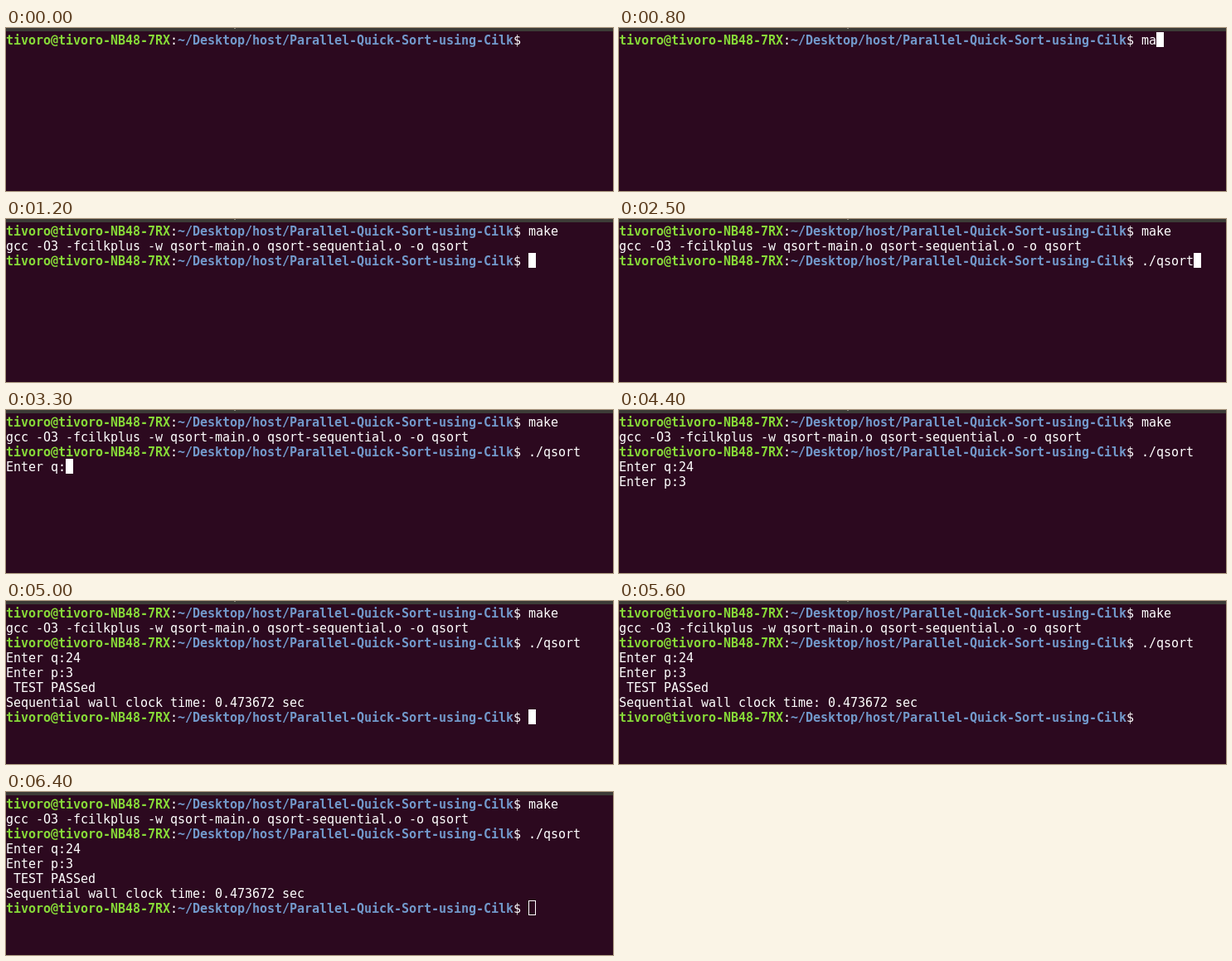
An HTML page with a canvas that plays this animation: 732 by 197 pixels, repeating every 6500 ms.

```html
<!DOCTYPE html>
<html lang="en">
<head>
<meta charset="utf-8">
<title>Terminal session</title>
<style>
  html, body { margin: 0; width: 100%; height: 100%; overflow: hidden; background: #2c091f; }
  canvas { display: block; }
</style>
</head>
<body>
<canvas id="screen" width="732" height="197"></canvas>
<script>
const ctx = document.getElementById('screen').getContext('2d', { alpha: false });

const LOOP = 6500;
const CELL_W = 9, CELL_H = 18, TOP = 5, ASCENT = 15;
const FONT = '15px "DejaVu Sans Mono", monospace';
const BACKGROUND = '#2c091f', WHITE = '#ffffff', GREEN = '#87da38', BLUE = '#7299cb';

const USER = 'tivoro@tivoro-NB48-7RX';
const PATH = '~/Desktop/host/Parallel-Quick-Sort-using-Cilk';
const PROMPT = `${USER}:${PATH}$ `;

// Text added to the terminal: [time, text]
const OUTPUT = [
  [0, PROMPT],
  [600, 'm'], [800, 'a'], [1000, 'ke'],
  [1200, '\ngcc -O3 -fcilkplus -w qsort-main.o qsort-sequential.o -o qsort\n' + PROMPT],
  [1800, '.'], [2000, '/'], [2400, 'q'], [2500, 'sort'],
  [3100, '\nEnter q:'], [3400, '2'], [3500, '4'],
  [3700, '\nEnter p:'], [3800, '3'], [4000, '\n'],
  [5000, ' TEST PASSed\nSequential wall clock time: 0.473672 sec\n' + PROMPT],
];

const CURSOR_HIDDEN = [[0, 300], [3000, 3300], [4400, 5000], [5600, 6200]];
const FOCUS_LOST = 6400;

// Mouse positions: [start, end, x, y]
const POINTER = [[5200, 5400, 332, 141], [5400, 5500, 322, 84], [5500, 5600, 308, 15]];

const during = t => ([start, end]) => t >= start && t < end;

function drawText(text, col, row, color, bold) {
  ctx.font = (bold ? 'bold ' : '') + FONT;
  ctx.fillStyle = color;
  [...text].forEach((char, i) =>
    ctx.fillText(char, (col + i) * CELL_W, TOP + row * CELL_H + ASCENT));
}

function drawLine(line, row) {
  if (!line.startsWith(USER)) return drawText(line, 0, row, WHITE);
  const pathCol = USER.length + 1, endCol = pathCol + PATH.length;
  drawText(USER, 0, row, GREEN, true);
  drawText(':', USER.length, row, WHITE);
  drawText(PATH, pathCol, row, BLUE, true);
  drawText(line.slice(endCol), endCol, row, WHITE);
}

function drawCursor(col, row, hollow) {
  const x = col * CELL_W, y = TOP + row * CELL_H;
  ctx.fillStyle = ctx.strokeStyle = WHITE;
  ctx.lineWidth = 1;
  if (hollow) ctx.strokeRect(x + 0.5, y + 0.5, CELL_W - 1, CELL_H - 1);
  else ctx.fillRect(x, y, CELL_W, CELL_H);
}

function drawPointer(x, y) {
  for (const [color, width] of [[WHITE, 3], ['#000000', 1]]) {
    ctx.strokeStyle = color;
    ctx.lineWidth = width;
    ctx.beginPath();
    ctx.moveTo(x - 3, y - 6.5);
    ctx.lineTo(x + 4, y - 6.5);
    ctx.moveTo(x + 0.5, y - 7);
    ctx.lineTo(x + 0.5, y + 7);
    ctx.moveTo(x - 3, y + 6.5);
    ctx.lineTo(x + 4, y + 6.5);
    ctx.stroke();
  }
}

function draw(t) {
  ctx.fillStyle = BACKGROUND;
  ctx.fillRect(0, 0, 732, 197);
  ctx.fillStyle = '#3c3b37';
  ctx.fillRect(0, 0, 732, 4);
  if (t < FOCUS_LOST) {
    ctx.fillStyle = '#8a877e';
    ctx.fillRect(275, 0, 2, 1);
  }

  const lines = OUTPUT.filter(([time]) => time <= t).map(([, text]) => text).join('').split('\n');
  lines.forEach(drawLine);

  if (!CURSOR_HIDDEN.some(during(t))) {
    const row = lines.length - 1;
    drawCursor(lines[row].length, row, t >= FOCUS_LOST);
  }
  const pointer = POINTER.find(during(t));
  if (pointer) drawPointer(pointer[2], pointer[3]);
}

const startTime = performance.now();
function tick() {
  draw((performance.now() - startTime) % LOOP);
  requestAnimationFrame(tick);
}
tick();
</script>
</body>
</html>
```
